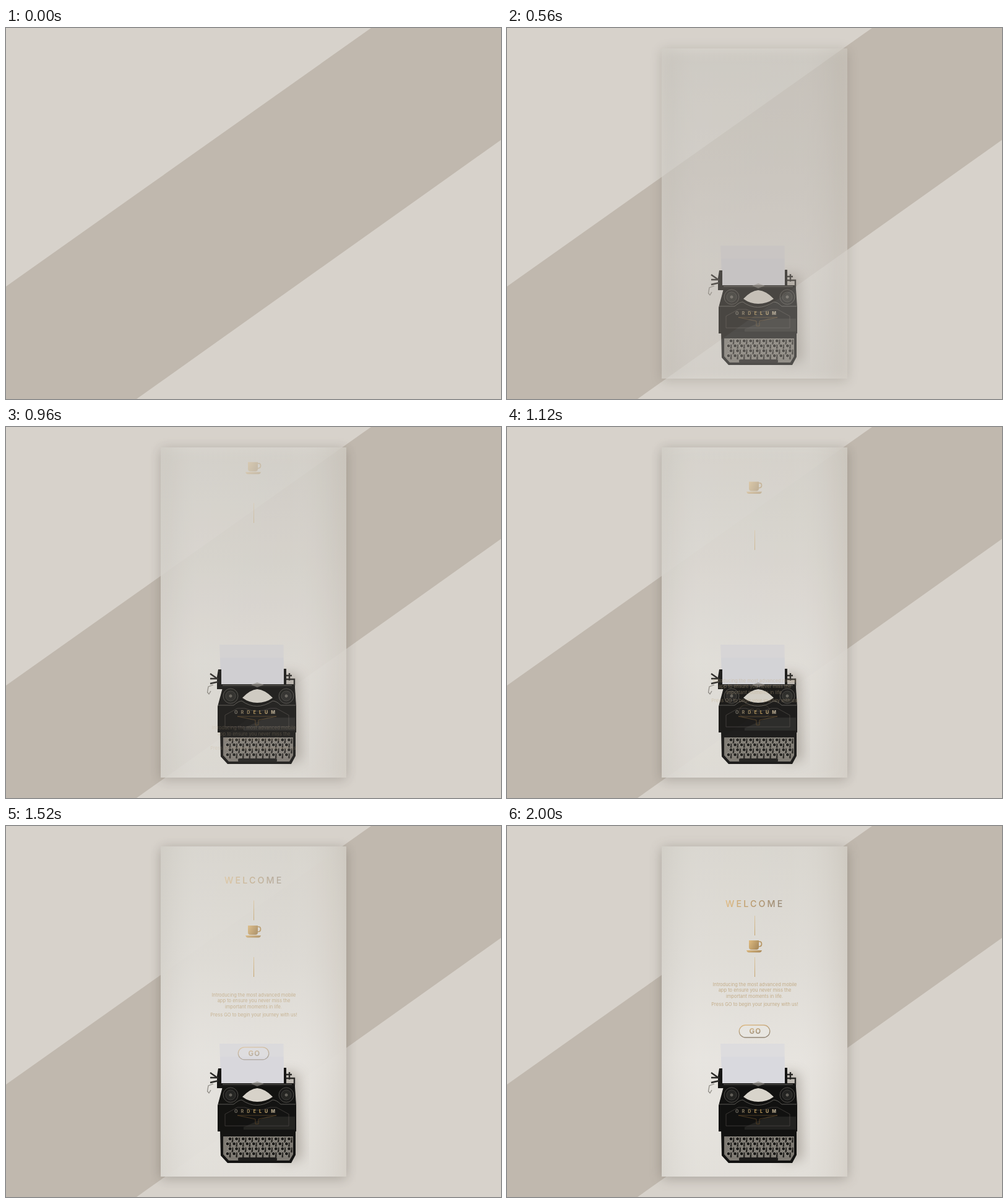
An HTML page for the animation above (3120 ms loop, 800 by 600 pixels).

```html
<!DOCTYPE html>
<html lang="en">
<head>
<meta charset="utf-8">
<title>Welcome screen</title>
<style>
  html, body { margin: 0; width: 100%; height: 100%; overflow: hidden; background: #d7d2cb; }
  svg { display: block; width: 800px; height: 600px; font-family: Inter, "Open Sans", sans-serif; }
</style>
</head>
<body>
<svg viewBox="0 0 800 600">
  <defs>
    <linearGradient id="wall" x2="0" y2="1">
      <stop stop-color="#d8d5ce"/><stop offset=".35" stop-color="#dedbd5"/>
      <stop offset=".65" stop-color="#e6e3de"/><stop offset="1" stop-color="#e1ded8"/>
    </linearGradient>
    <linearGradient id="sides">
      <stop stop-color="#a9a59b" stop-opacity=".14"/><stop offset=".2" stop-color="#fff" stop-opacity=".06"/>
      <stop offset=".7" stop-color="#fff" stop-opacity=".03"/><stop offset="1" stop-color="#a99d8e" stop-opacity=".2"/>
    </linearGradient>
    <linearGradient id="gold" x2="1" y2=".5">
      <stop stop-color="#dfbb80"/><stop offset="1" stop-color="#ac8d5e"/>
    </linearGradient>
    <linearGradient id="thread" x2="0" y2="1">
      <stop stop-color="#dcc8a5"/><stop offset="1" stop-color="#c5a36b"/>
    </linearGradient>
    <linearGradient id="title">
      <stop stop-color="#e0bc86"/><stop offset=".4" stop-color="#bd9c6c"/><stop offset="1" stop-color="#948777"/>
    </linearGradient>
    <linearGradient id="rim" x2=".3" y2="1">
      <stop stop-color="#dfbb85"/><stop offset="1" stop-color="#938776"/>
    </linearGradient>
    <linearGradient id="letters">
      <stop stop-color="#5f5d58"/><stop offset=".6" stop-color="#b8944f"/><stop offset="1" stop-color="#b8b3a8"/>
    </linearGradient>
    <filter id="soft" x="-30%" y="-30%" width="160%" height="160%"><feGaussianBlur stdDeviation="10"/></filter>
    <clipPath id="screen"><rect x="250" y="33" width="300" height="534"/></clipPath>
  </defs>

  <path d="M0 418 590 0H800V181L211 600H0Z" fill="#c0b8ae"/>

  <!-- the shadow fades on its own, so it shows through the translucent card -->
  <g id="shadow"><rect x="250" y="36" width="300" height="534" fill="#4f483f" opacity=".34" filter="url(#soft)"/></g>

  <g id="card">
    <rect x="250" y="33" width="300" height="534" fill="url(#wall)"/>
    <rect x="250" y="33" width="300" height="534" fill="url(#sides)"/>
    <path d="M440 400H472L478 540H440Z" fill="#6d6359" opacity=".42" filter="url(#soft)"/>

    <!-- paper and carriage -->
    <path d="M345 352H448.500L449 417H348Z" fill="#dddcde"/>
    <path d="M346 373H448.500L449 417H348Z" fill="#d9d9de"/>
    <path d="M343 392H348V416H449V391H453V416H467V424H341V404Z" fill="#151514"/>
    <path d="M330 399 343 408M330 407H343M330 415 343 412M453 402H462M458 398V410M453 408H466V418" fill="none" stroke="#292826" stroke-width="2.400"/>
    <path d="M335 417 327 420 325.500 429 328 432 331 427" fill="none" stroke="#8e8b85" stroke-width="1.300"/>
    <path d="M350 418H462" stroke="#77756f" stroke-width=".8"/>

    <!-- body -->
    <path d="M350 422H467L469 452V494H342V452Z" fill="#111110"/>
    <path d="M382 438Q394 425 406 424 419 425 431 438 420 446 406 446 393 446 382 438Z" fill="#d8d4cb"/>
    <path d="M396 417 406 413 417 417 406 421Z" fill="#8f8c86" opacity=".6"/>
    <g id="spools"></g>
    <path d="M343 450H368Q376 443 381 443 405 460 431 443 437 443 444 450H468" fill="none" stroke="#5b5954"/>
    <path d="M354 485V466L374 455H386Q406 464 427 455H437L457 466V485Z" fill="none" stroke="#44413d" stroke-width=".8"/>
    <path d="M384 487 422 470H467V491H384Z" fill="#55534f" opacity=".25"/>
    <path d="M374 468H437L408 474V482H403V474Z" fill="none" stroke="#5c4628" stroke-width=".8"/>
    <text x="369" y="463.500" font-size="7.200" font-weight="800" letter-spacing="5" fill="url(#letters)">ORDELUM</text>

    <!-- keyboard -->
    <path d="M346 492H468V532L461 545H358L347 533Z" fill="#121211"/>
    <path d="M351 502H464V531L458 541H360L351 531Z" fill="#7d7972"/>
    <g id="keys"></g>
    <rect x="375" y="536" width="63" height="5.500" rx="2" fill="#1b1a19"/>
  </g>

  <g clip-path="url(#screen)">
    <text id="welcome" x="353" y="131" font-size="14.300" font-weight="500" letter-spacing="3.100" fill="url(#title)">WELCOME</text>
    <rect id="upperLine" x="400" y="145" width="1" height="32" fill="url(#thread)"/>
    <g id="cup" fill="url(#gold)">
      <path d="M391 185H407V196Q407 200 403 200H395Q391 200 391 196Z"/>
      <path d="M407 187H408.500Q411.500 187 411.500 191T407 195" fill="none" stroke="#b5935f" stroke-width="1.700"/>
      <path d="M387 201H412Q411 204.500 408 204.500H391Q388 204.500 387 201Z"/>
    </g>
    <rect id="lowerLine" x="400" y="212" width="1" height="32" fill="url(#thread)"/>
    <g id="intro" font-size="7.500" text-anchor="middle" fill="#c3ad89">
      <text x="400.500" y="258.500">Introducing the most advanced mobile</text>
      <text x="400.500" y="268">app to ensure you never miss the</text>
      <text x="400" y="277.500">important moments in life.</text>
      <text x="400.500" y="291">Press GO to begin your journey with us!</text>
    </g>
    <g id="button">
      <rect x="375.300" y="322" width="49.500" height="20" rx="10" fill="#fff" fill-opacity=".12" stroke="url(#rim)" stroke-width="1.300"/>
      <text x="391.500" y="336" font-size="11.500" font-weight="700" letter-spacing="1" fill="url(#rim)">GO</text>
    </g>
  </g>
</svg>
<script>
const LOOP = 3120, STEP = 40, FADE_IN = 2000;
const byId = id => document.getElementById(id);
const circle = (x, y, r, fill, stroke) =>
  `<circle cx="${x}" cy="${y}" r="${r}" fill="${fill}" stroke="${stroke}" stroke-width=".8"/>`;

byId('spools').innerHTML = [363, 453].map(x =>
  circle(x, 435, 12, '#171716', '#5d5b56') + circle(x, 435, 8, '#242422', '#464540') +
  circle(x, 435, 2, '#5d5a54', '#77736b')).join('');

let keys = '';
for (let row = 0; row < 4; row++) {
  for (let i = 0; i < 10; i++) {
    const x = 362 + i * 10.6 - (row % 2) * 4, y = 506 + row * 8;
    keys += `<path d="M${x + 4} ${y - 2}v8" stroke="#23221f" stroke-width="2.4"/>` +
      circle(x, y, 3, '#1b1a18', '#b5b1a7');
  }
}
byId('keys').innerHTML = keys;

// Each part glides `travel` pixels to its resting place while it fades in.
const parts = {
  lowerLine: { start: 600, end: 1400, travel: -218 },
  cup: { start: 620, end: 1690, travel: -199, power: 1.15 },
  intro: { start: 720, end: 1640, travel: 363 },
  upperLine: { start: 840, end: 1640, travel: -423 },
  button: { start: 1020, end: 1820, travel: 156 },
  welcome: { start: 960, end: 1970, travel: -128 }
};

const progress = (t, start, end) => Math.min(1, Math.max(0, (t - start) / (end - start)));

function draw(now) {
  const t = Math.floor(now % LOOP / STEP) * STEP;
  const cardAlpha = 1 - (1 - progress(t, 0, FADE_IN)) ** 3;
  for (const id of ['shadow', 'card']) byId(id).setAttribute('opacity', cardAlpha);
  for (const [id, { start, end, travel, power = 1.5 }] of Object.entries(parts)) {
    const u = progress(t, start, end);
    byId(id).setAttribute('transform', `translate(0 ${travel * (1 - u) ** power})`);
    byId(id).setAttribute('opacity', u);
  }
}

const origin = performance.now();
function tick() {
  draw(performance.now() - origin);
  requestAnimationFrame(tick);
}
tick();
</script>
</body>
</html>
```
